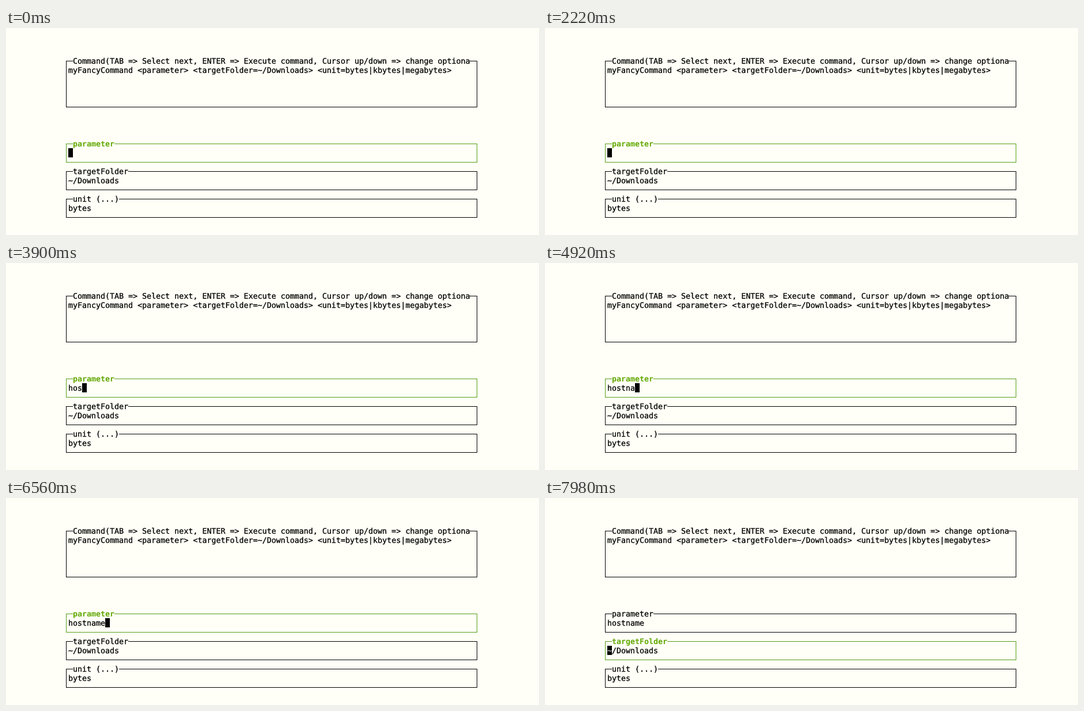
Animation, 924 px wide and 360 px high, one loop 8000 ms. Source, as an HTML page:

```html
<!DOCTYPE html>
<html lang="en">
<head>
<meta charset="utf-8">
<title>Command form</title>
<style>
  html, body { margin: 0; width: 100%; height: 100%; overflow: hidden; background: #fffff7; }
  svg { display: block; width: 924px; height: 360px; }
  text {
    font: 13.3px "DejaVu Sans Mono", monospace; white-space: pre; text-rendering: geometricPrecision;
    fill: #000; stroke: #000; stroke-width: .3px;
  }
  path { fill: none; stroke: #000; stroke-width: 1; shape-rendering: crispEdges; }
  .focus path { stroke: #559e16; }
  .focus .title { fill: #62a803; stroke: none; font-weight: bold; }
  .under { fill: #fffff7; stroke: none; }
</style>
</head>
<body>
<svg id="stage" viewBox="0 0 924 360"></svg>
<script>
const LOOP = 8000, BLINK = 500;
const CELL = 8, LEFT = 108;
const WORD = "hostname", TYPE_START = 3000, TYPE_STEP = 350, TAB_AT = 7540;
const stage = document.getElementById("stage");

function add(parent, tag, attrs, content = "") {
  const el = document.createElementNS("http://www.w3.org/2000/svg", tag);
  for (const key in attrs) el.setAttribute(key, attrs[key]);
  el.textContent = content;
  return parent.appendChild(el);
}

// A bordered box whose title interrupts the top line.
function box(top, height, title, value) {
  const group = add(stage, "g", {});
  const y = top + .5, x = LEFT + CELL, end = x + title.length * CELL;
  add(group, "path", { d: `M${x} ${y}H104.5V${y + height}H816.5V${y}H${end}` });
  add(group, "text", { x, y: top + 5, class: "title" }, title);
  const text = add(group, "text", { x: LEFT, y: top + 21 }, value);
  return { group, text, top };
}

box(57, 80, "Command(TAB => Select next, ENTER => Execute command, Cursor up/down => change optiona",
  "myFancyCommand <parameter> <targetFolder=~/Downloads> <unit=bytes|kbytes|megabytes>");
const parameter = box(201, 32, "parameter", "");
const folder = box(249, 32, "targetFolder", "~/Downloads");
box(297, 32, "unit (...)", "bytes");

const cursor = add(stage, "g", {});
const block = add(cursor, "rect", { width: CELL, height: 16, "shape-rendering": "crispEdges" });
const under = add(cursor, "text", { class: "under" });

function render(t) {
  const tabbed = t >= TAB_AT;
  const typed = Math.max(0, Math.min(WORD.length, Math.floor((t - TYPE_START) / TYPE_STEP) + 1));
  const lastKey = tabbed ? TAB_AT : typed ? TYPE_START + (typed - 1) * TYPE_STEP : 0;
  const active = tabbed ? folder : parameter;
  const x = LEFT + (tabbed ? 0 : typed * CELL);

  parameter.text.textContent = WORD.slice(0, typed);
  parameter.group.setAttribute("class", tabbed ? "" : "focus");
  folder.group.setAttribute("class", tabbed ? "focus" : "");

  // Every key press restarts the blink.
  const on = Math.floor((t - lastKey) / BLINK) % 2 === 0;
  cursor.setAttribute("visibility", on ? "visible" : "hidden");
  block.setAttribute("x", x);
  block.setAttribute("y", active.top + 8);
  under.setAttribute("x", x);
  under.setAttribute("y", active.top + 21);
  under.textContent = tabbed ? "~" : "";
}

const start = performance.now();
function tick() {
  render((performance.now() - start) % LOOP);
  requestAnimationFrame(tick);
}
tick();
</script>
</body>
</html>
```
